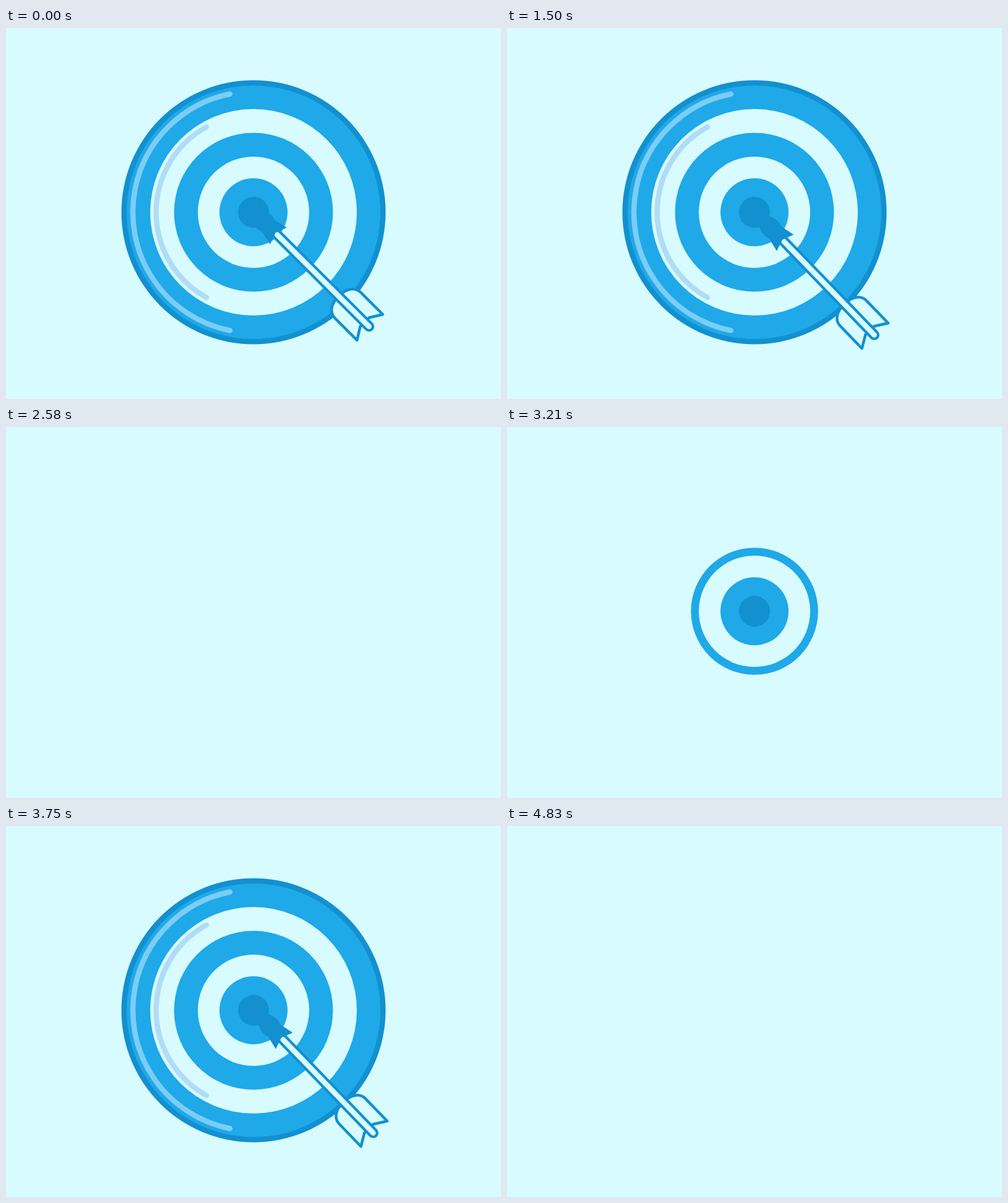
Recreate the animation shown at these times as an HTML page with a canvas. Size 800 by 600 pixels, loop 4.95 s.

```html
<!DOCTYPE html>
<html lang="en">
<head>
<meta charset="utf-8">
<title>Target</title>
<style>
  html, body { margin: 0; width: 100%; height: 100%; overflow: hidden; background: #d8fbff; }
  canvas { display: block; }
</style>
</head>
<body>
<canvas id="stage" width="800" height="600"></canvas>
<script>
const ctx = document.getElementById('stage').getContext('2d');
const PALE = '#d8fbff', BLUE = '#1fa9e8', DARK = '#1290d0';
const LOOP = 4950, STEP = 30, INTRO = 450, CYCLE = 2250;

// Outermost first. Times are counted in steps: start of the pop-in, peak of the exit.
const layers = [
  { start: 19, peak: 43, discs: [[213.5, DARK], [205, BLUE]], shine: [195, '#7ccdf5', 1.374] },
  { start: 15, peak: 47.24, discs: [[167, PALE]], shine: [157.5, '#b0dcf5', 1.067] },
  { start: 11, peak: 52, discs: [[128.4, BLUE]] },
  { start: 7, peak: 56, discs: [[90, PALE]] },
  { start: 3, peak: 60, discs: [[55, BLUE]] },
  { start: -1, peak: 64, discs: [[25, DARK]] }
];

// Linear interpolation through [time, value] keys.
function track(n, keys) {
  if (n <= keys[0][0]) return keys[0][1];
  for (let i = 1; i < keys.length; i++) {
    const [a, from] = keys[i - 1], [b, to] = keys[i];
    if (n <= b) return from + (to - from) * (n - a) / (b - a);
  }
  return keys[keys.length - 1][1];
}

const layerScale = (n, { start: s, peak: p }) => track(n, [
  [s, 0], [s + 3, 1.2], [s + 5, 0.8], [s + 7, 1], [p - 3, 1], [p, 1.2], [p + 6, 0]
]);

function drawLayer({ discs, shine }, scale) {
  if (scale < 0.001) return;
  ctx.save();
  ctx.scale(scale, scale);
  for (const [r, color] of discs) {
    ctx.fillStyle = color;
    ctx.beginPath();
    ctx.arc(0, 0, r, 0, 2 * Math.PI);
    ctx.fill();
  }
  if (shine) {
    const [r, color, spread] = shine;
    ctx.strokeStyle = color;
    ctx.lineWidth = 8.5;
    ctx.beginPath();
    ctx.arc(0, 0, r, Math.PI - spread, Math.PI + spread);
    ctx.stroke();
  }
  ctx.restore();
}

const head = new Path2D('M-4 0C8 -16 22 -18 34 -14L57 -19L50 0L57 19L34 14C22 18 8 16 -4 0Z');
const feather = new Path2D('M195 -5C196 -20 204 -29.5 216 -29.5L266 -29.5L254 -10L254 -5Z');
const shaft = new Path2D('M54 0H264');

function strokePath(path, color, width) {
  ctx.strokeStyle = color;
  ctx.lineWidth = width;
  ctx.stroke(path);
}

function drawArrow(scale, distance, tilt) {
  if (scale < 0.001) return;
  ctx.save();
  ctx.scale(scale, scale);
  ctx.translate(0, -2);
  ctx.rotate((45 + tilt) * Math.PI / 180);
  ctx.translate(distance, 0);
  for (const side of [1, -1]) {
    ctx.save();
    ctx.scale(1, side);
    ctx.fillStyle = PALE;
    ctx.fill(feather);
    strokePath(feather, DARK, 4.5);
    ctx.restore();
  }
  strokePath(shaft, DARK, 17);
  strokePath(shaft, PALE, 8.5);
  ctx.fillStyle = DARK;
  ctx.fill(head);
  ctx.restore();
}

function draw(time) {
  const t = Math.floor(time % LOOP / STEP) * STEP;
  // The loop opens on the finished pose, then plays two cycles.
  const n = t < INTRO ? 38 : (t - INTRO) % CYCLE / STEP - 1;
  ctx.setTransform(1, 0, 0, 1, 0, 0);
  ctx.fillStyle = PALE;
  ctx.fillRect(0, 0, 800, 600);
  ctx.translate(400, 298);
  ctx.lineCap = ctx.lineJoin = 'round';
  for (const layer of layers) drawLayer(layer, layerScale(n, layer));
  if (n >= 26) {
    const distance = track(n, [[26, 470], [33, 34], [34, 14.5], [36, 0]]);
    const tilt = track(n, [[33, 0], [34, 1], [36, -0.6], [38, 0]]);
    drawArrow(layerScale(n, layers[0]), distance, tilt);
  }
}

const begin = performance.now();
function tick() {
  draw(performance.now() - begin);
  requestAnimationFrame(tick);
}
tick();
</script>
</body>
</html>
```
